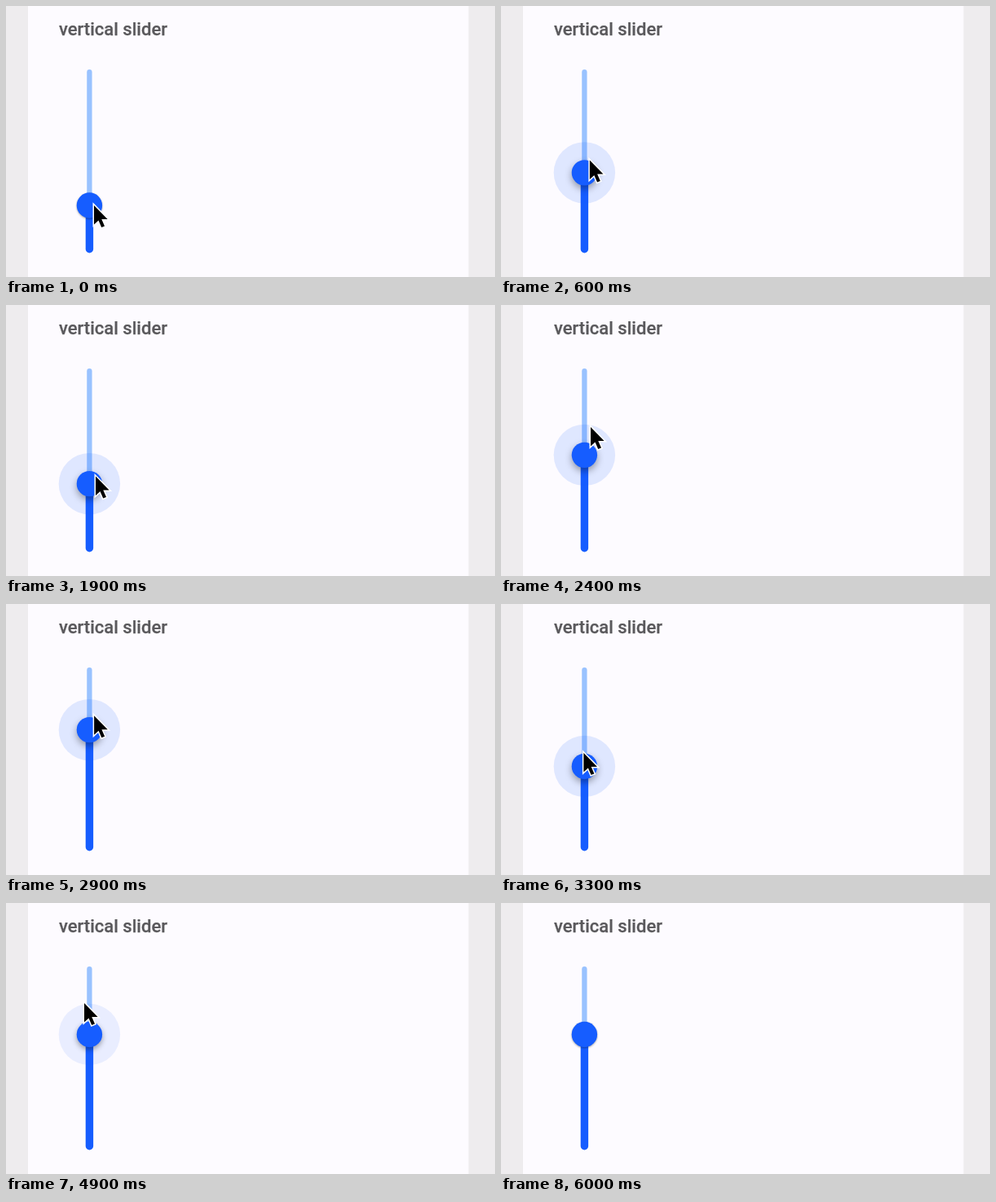
An HTML page for the animation above (6600 ms loop, 600x333 px).

```html
<!DOCTYPE html>
<html lang="en">
<head>
<meta charset="utf-8">
<title>Vertical slider</title>
<style>
  html, body { margin: 0; width: 100%; height: 100%; overflow: hidden; background: #eeecee; }
  svg { display: block; width: 600px; height: 333px; }
  text { font: 500 22px Roboto, sans-serif; fill: #5a595c; stroke: #5a595c; stroke-width: .25px; }
</style>
</head>
<body>
<svg viewBox="0 0 600 333">
  <rect x="27" width="540.5" height="333" fill="#fdfbff"/>
  <text x="65" y="35.5">vertical slider</text>
  <rect x="99.26" y="78" width="6.28" height="225" rx="3.14" fill="#99c2ff"/>
  <rect id="fill" x="97.7" width="9.42" rx="4.71" fill="#165dff"/>
  <g id="thumb" fill="#165dff">
    <circle id="halo" r="37.7" fill-opacity=".125"/>
    <circle id="knob" r="15.7"/>
  </g>
  <path id="pointer" d="M0 0V23.5L5.5 18.5L9.2 27L13 25.4L9.3 17H16.6Z"
        stroke="#fff" stroke-width="3" paint-order="stroke"/>
</svg>
<script>
const LOOP = 6600, STEP = 100, LEAD = 50, BOTTOM = 303.5;
const $ = id => document.getElementById(id);

// Turning points of the drag: time, thumb y, pointer x, pointer y
const turns = [
  [200, 245, 108, 245],
  [1200, 131, 110, 114.5],
  [2150, 238, 110, 223],
  [2600, 146, 110, 124.5],
  [2700, 146, 110, 124.5],
  [3700, 228.5, 98, 206],
  [4600, 161.5, 96, 123],
  [5500, 161.5, 96, 123],
  [5700, 161.5, 97, 112]
];

const ramp = (t, from, to) => Math.max(0, Math.min(1, (t - from) / (to - from)));
const ease = u => u * u * (3 - 2 * u);

// Ease from one turning point to the next
function at(t, col) {
  let value = turns[0][col];
  for (let i = 1; i < turns.length; i++) {
    const a = turns[i - 1], b = turns[i];
    value += (b[col] - a[col]) * ease(ramp(t, a[0], b[0]));
  }
  return value;
}

function draw(now) {
  const t = Math.floor(now % LOOP / STEP) * STEP;
  const y = at(t, 1);
  const press = ramp(t, 200, 400) * ramp(t, 5100, 4800);
  const drop = 1 + 3.5 * press;

  $('fill').setAttribute('y', y);
  $('fill').setAttribute('height', BOTTOM - y);
  $('thumb').setAttribute('transform', `translate(102.4 ${y})`);
  $('halo').setAttribute('opacity', press);
  $('knob').style.filter = `drop-shadow(0 ${drop}px ${drop}px rgba(0, 0, 0, .35))`;

  // The pointer runs slightly ahead of the thumb
  const ahead = t + LEAD;
  $('pointer').setAttribute('transform', `translate(${at(ahead, 2)} ${at(ahead, 3)})`);
  $('pointer').setAttribute('visibility', t < 5800 ? 'visible' : 'hidden');
}

function loop() {
  draw(performance.now());
  requestAnimationFrame(loop);
}
loop();
</script>
</body>
</html>
```
